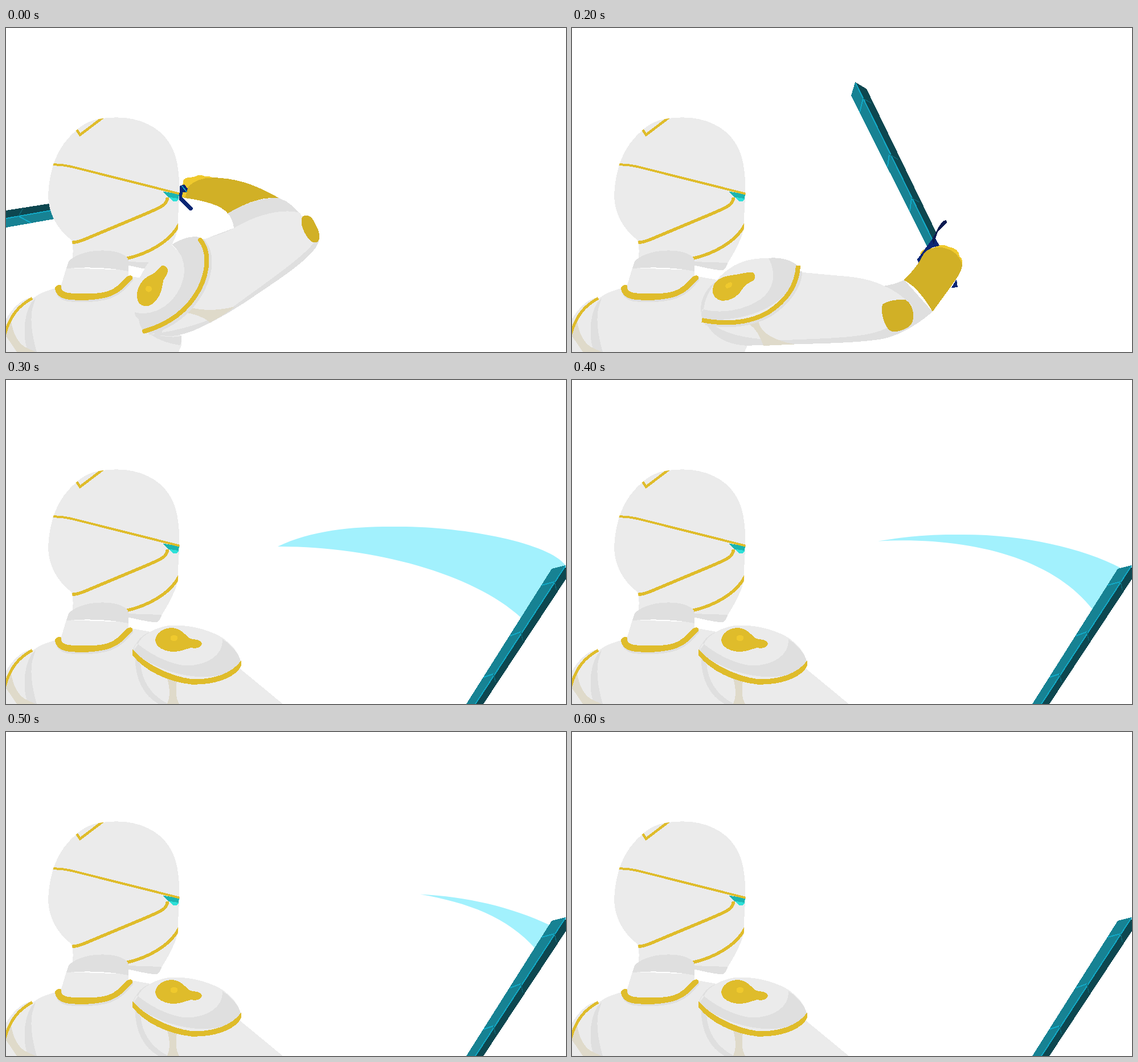
An HTML page that plays this animation: 983x570 px, repeating every 0.7 s.

```html
<!DOCTYPE html>
<html lang="en">
<head>
<meta charset="utf-8">
<title>Sword swing</title>
<style>
  html, body { margin: 0; width: 100%; height: 100%; overflow: hidden; background: #fff; }
  svg { display: block; width: 100%; height: 100%; shape-rendering: crispEdges; }
  .light { fill: #ebebeb; }
  .shade { fill: #dfdfdf; }
  .gold { fill: #dfbc2b; }
  .glove { fill: #d1b026; }
  .bright { fill: #efc92d; }
  .beige { fill: #dfdaca; }
  .teal { fill: #178293; }
  .deep { fill: #0d4750; }
  .navy { fill: #0b2674; }
  .night { fill: #0a1a50; }
  .slash { fill: #a2f1fd; shape-rendering: auto; }
  .trim, .under, .edge, .groove { fill: none; }
  .trim { stroke: #dfbc2b; stroke-linejoin: miter; }
  .under { stroke: #dfdfdf; }
  .edge { stroke: #12a9c6; stroke-width: 2; }
  .groove { stroke: #0f6876; stroke-width: 1.5; }
  [data-on] { opacity: 0; }
</style>
</head>
<body>
<svg viewBox="0 0 983 570" preserveAspectRatio="none">
  <defs>
    <path id="skull" d="M190 157.500C232 156 268 173 286 201C301 224 304 250 304.500 290L302.500 325L302 352C298 372 285 395 273 414L214 412L117 404C118 392 118 382 115 373C90 355 74 325 74 294C75 270 79 255 83 240C92 212 108 192 128 176C145 162 165 158 190 157.500Z"/>
    <clipPath id="skullClip"><use href="#skull"/></clipPath>
    <path id="collar" d="M86 460C85 454 92 450 97 453C96 463 102 466 120 467C150 468 172 468 188 459C200 452 207 441 213 437C219 433 224 437 222 441C210 454 200 466 183 472C160 480 125 480 105 477C93 474 88 468 86 460Z"/>
  </defs>

  <!-- blade resting behind the head -->
  <g data-on="0 200">
    <path class="deep" d="M0 321L76 309L90 319L0 335.500Z"/>
    <path class="teal" d="M0 335L90 319L90 335L0 351Z"/>
    <path class="edge" d="M0 335L85 320M22 331L44 343"/>
    <path class="groove" d="M22 331L30 317"/>
  </g>

  <!-- head -->
  <use href="#skull" class="light"/>
  <g clip-path="url(#skullClip)">
    <path class="trim" stroke-width="4.500" d="M122 176L130 188L172 156"/>
    <path class="trim" stroke-width="4" d="M80 240.500C98 239.500 105 242 115 244L306 292"/>
    <path class="trim" stroke-width="5.500" d="M114 377.500C125 377 130 375 140 371L245 327C270 316 283 312 283.500 298M210 406C250 397 288 376 304 345"/>
    <path fill="#2ee0d8" d="M276 288L304 293L302.500 302C300 306 296 306 292 304Z"/>
    <path fill="#1cb5b0" d="M275.500 287.500L304 292.500L302.500 300L285 297.500Z"/>
    <path class="trim" stroke-width="4" d="M270 283L306 292"/>
  </g>

  <!-- neck and torso -->
  <path class="shade" d="M213 411L273.500 413C271 420 268 426.500 262 426.500C245 424.500 230 421 213 417Z"/>
  <path class="light" d="M0 512C10 495 25 479 40 475L48 475C60 466 72 462 86 458L97 452L106 422L215 426L215 436L254 443L260 470L308 543L308 558L303 570L0 570Z"/>
  <path class="shade" d="M106 423L110 410C125 396 150 391 172 391.500C196 392 213 399 215 409L215 428C180 421 140 420 106 423Z"/>
  <path class="shade" d="M52 475C40 484 36 500 33 520C31 545 35 560 39 570L54 570C45 540 41 505 48 488Z"/>
  <path class="beige" d="M9 516C12 535 20 553 33 561L52 570L19 570C12 560 6 550 0 542L4 530Z"/>
  <path class="trim" stroke-width="5" d="M-2 539C6 510 20 489 46 475.500"/>
  <use href="#collar" class="shade" x="1" y="3.500"/>
  <use href="#collar" class="gold"/>

  <!-- arm folded behind the head -->
  <g data-on="0 200">
    <path class="shade" d="M252 538C275 543 300 546 308 541C309 550 307 557 305 558C290 556 270 551 252 538Z"/>
    <path class="shade" d="M389 326C420 308 450 297 479 299C497 305 512 320 521 334L549 376C542 400 490 435 450 462C410 490 370 515 330 532C310 540 290 544 260 540L300 390L400 352C399 343 396 333 389 326Z"/>
    <path class="light" d="M300 385C340 372 370 368 400 352C440 328 485 317 516 325L543 374C525 402 450 452 398 491C370 512 320 528 274 536Z"/>
    <path class="shade" d="M358 517L402 490C370 515 330 535 300 541C285 543 272 542 262 538C300 531 335 526 358 517Z"/>
    <path class="beige" d="M316 489C340 498 370 498 402 490C390 500 374 510 358 518C348 509 332 503 312 500Z"/>
    <path class="glove" d="M520 332C527 327 536 330 541 341C547 352 552 361 549.500 372C548 379 540 379 534 374C526 366 514 345 520 332Z"/>
    <path class="bright" d="M311 269C314 261 325 264 333 261C338 257 345 259 349 261C353 260 360 261 363 264L322 300L308 298Z"/>
    <path class="glove" d="M314 299C318 291 316 285 320 279C332 267 350 261 378 264C415 267 445 280 479 299C450 296 420 308 389 326C378 312 350 304 314 299Z"/>
    <path class="navy" d="M305 278L313 275L319 283L317 289L310 289L309 298L328 316C329 320 325 322 321 320L304 302Z"/>
    <path class="edge" d="M309 278L317 288"/>
    <path class="light" d="M291 381C270 393 250 408 243 424L234 440L222 500L245 530L300 500L325 420Z"/>
    <path class="under" stroke-width="10" d="M343 374C361 393 361 427 343 462C323 498 293 523 250 535"/>
    <path class="shade" d="M291 381C310 369 330 364 341 369L352 400C355 450 310 510 242 534C236 527 234 520 233 512C227 508 226 505 226 500C245 506 270 500 290 480C318 450 323 405 291 381Z"/>
    <path class="trim" stroke-width="8" stroke-linecap="round" d="M341 373C356 391 357 425 339 460C320 495 290 520 243 533.500"/>
    <path class="gold" d="M230 470C230 455 240 440 255 434C262 431 266 425 271 420C277 415 285 420 284 429C283 436 275 441 275 450C273 470 262 485 250 489C238 491 229 485 230 470Z"/>
    <circle class="bright" cx="250.500" cy="459" r="5.500"/>
  </g>

  <!-- arm swinging forward -->
  <g data-on="200 300">
    <path class="shade" d="M232 512C245 545 275 558 310 559C350 555 480 558 545 547C580 540 615 515 633 499L583 443C570 450 558 452 546 454L400 440Z"/>
    <path class="light" d="M252 525C285 546 340 551 400 548C480 545 525 542 552 528L598 490C585 475 565 460 546 453C530 445 505 438 470 436L395 429L330 510Z"/>
    <path class="beige" d="M309 519L327 516C332 538 355 549 390 556.500L336 559C331 545 325 530 309 519Z"/>
    <path class="glove" d="M545 486C555 479 575 477 585 478C595 483 600 495 599 510C598 520 595 525 583 530C570 535 563 536 558 532C548 525 541 500 545 486Z"/>
    <path class="teal" d="M497 95L490 119L624 386L634 375Z"/>
    <path class="deep" d="M497 95L517 107L640 361L634 376Z"/>
    <path class="edge" d="M498 97L633 373M511 124L505 148M557 222L554 244M596 299L593 322"/>
    <path class="groove" d="M511 124L525 132M557 222L572 231M596 299L609 306"/>
    <path class="edge" d="M624 385L634 374"/>
    <path class="bright" d="M611 398C612 388 625 388 635 387C645 380 655 381 661 385C672 386 680 393 680 401C686 405 686 415 684 420L618 402Z"/>
    <path class="navy" d="M625 385L638 370L645 383L626 388ZM666 457L675 442L677 456Z"/>
    <path class="night" d="M657 338C651 338 645 346 640 357L632 372L606 407C607 414 612 416 614 411L635 381L642 358L658 342Z"/>
    <path class="navy" d="M632 372L606 407C607 414 612 416 614 411L635 381Z"/>
    <path class="glove" d="M582 443C600 427 608 415 617 398C625 385 645 383 660 389C672 393 683 405 685 418C684 430 675 440 665 455L633 499C620 478 605 455 582 443Z"/>
    <path class="under" stroke-width="9" d="M234 518C272 525 314 523 348 503C378 483 399 455 400 428"/>
    <path class="light" d="M228 500C232 465 260 425 300 411C320 404 355 403 370 407C385 411 395 418 399 430C395 460 360 500 300 515L230 512Z"/>
    <path class="shade" d="M345 405C365 402 395 410 399 424C385 480 320 520 229 512C226 505 227 495 230 495C260 503 300 498 330 478C356 460 359 430 345 405ZM253 446C240 453 224 475 226 500L231 495C233 475 243 458 253 446Z"/>
    <path class="trim" stroke-width="8" d="M228 514C270 522 310 520 345 500C375 480 395 455 397 418"/>
    <path class="gold" d="M247 460C248 445 262 437 280 435C295 433 300 431 310 430C318 428 323 433 321 440C318 448 308 446 300 458C292 473 278 480 264 480C252 478 246 470 247 460Z"/>
    <path class="bright" d="M269 454C271 449 277 446 281 448C283 454 278 458 271 458Z"/>
  </g>

  <!-- trail shrinking towards the blade -->
  <path class="slash" data-on="300 400" d="M477 293C540 262 620 257 690 258C810 258 955 288 982 326L958 340L904 418C820 340 640 292 477 293Z"/>
  <path class="slash" data-on="400 500" d="M537 283.500C600 273 640 271.500 685 272C790 271.500 895 295 964 331L914 404C845 314 700 275 537 283.500Z"/>
  <path class="slash" data-on="500 600" d="M727 285.500C810 290 885 307 955 340L930 382C880 325 810 300 727 285.500Z"/>

  <!-- arm lowered -->
  <g data-on="300 700">
    <path class="teal" d="M958 332L982 326L824 570L808 570Z"/>
    <path class="deep" d="M982 326L985 347L838 570L823 570Z"/>
    <path class="edge" d="M982 327L824 570M940 361L963 355M885 450L904 443M838 523L856 517"/>
    <path class="groove" d="M963 355L966 369M904 443L907 458M856 517L859 531"/>
    <path class="light" d="M226 480L411 508L486 570L226 570Z"/>
    <path class="shade" d="M226 484L236 497C238 530 255 555 285 570L268 570C243 556 227 530 226 484Z"/>
    <path class="beige" d="M283 525L300 528C297 548 298 560 304 570L283 570C289 555 288 543 283 525Z"/>
    <path class="light" d="M226 478C228 455 255 437 285 432C320 429 360 440 382 455C395 465 408 478 412 494C390 530 290 530 226 478Z"/>
    <path class="shade" d="M380 456C395 465 408 480 413 496C390 535 290 532 223 478C223 470 226 464 231 464C250 480 280 497 310 502C350 505 382 485 380 456ZM254 443C240 447 227 460 224 476L231 466C235 455 244 448 254 443Z"/>
    <path class="gold" d="M222 474C245 500 288 521 325 526C360 528 395 518 412.500 494C414 500 413 504 409 509C395 527 360 537 325 535.500C285 531 243 512 222 484Z"/>
    <path class="gold" d="M262 458C263 445 275 437 290 436C305 436 312 446 322 454C330 458 342 455 344 464C342 471 335 473 325 471C315 473 308 478 295 478C278 478 263 470 262 458Z"/>
    <ellipse class="bright" cx="295" cy="454" rx="6.500" ry="5"/>
  </g>
</svg>
<script>
  const LOOP = 700;
  const hold = (offset, opacity) => ({ offset, opacity, easing: 'steps(1, end)' });

  for (const el of document.querySelectorAll('[data-on]')) {
    const [from, to] = el.dataset.on.split(' ').map(t => t / LOOP);
    const keys = [hold(0, from ? 0 : 1)];
    if (from) keys.push(hold(from, 1));
    if (to < 1) keys.push(hold(to, 0));
    keys.push(hold(1, to < 1 ? 0 : 1));
    const anim = el.animate(keys, { duration: LOOP, iterations: Infinity });
    anim.startTime = 0;
  }
</script>
</body>
</html>
```
